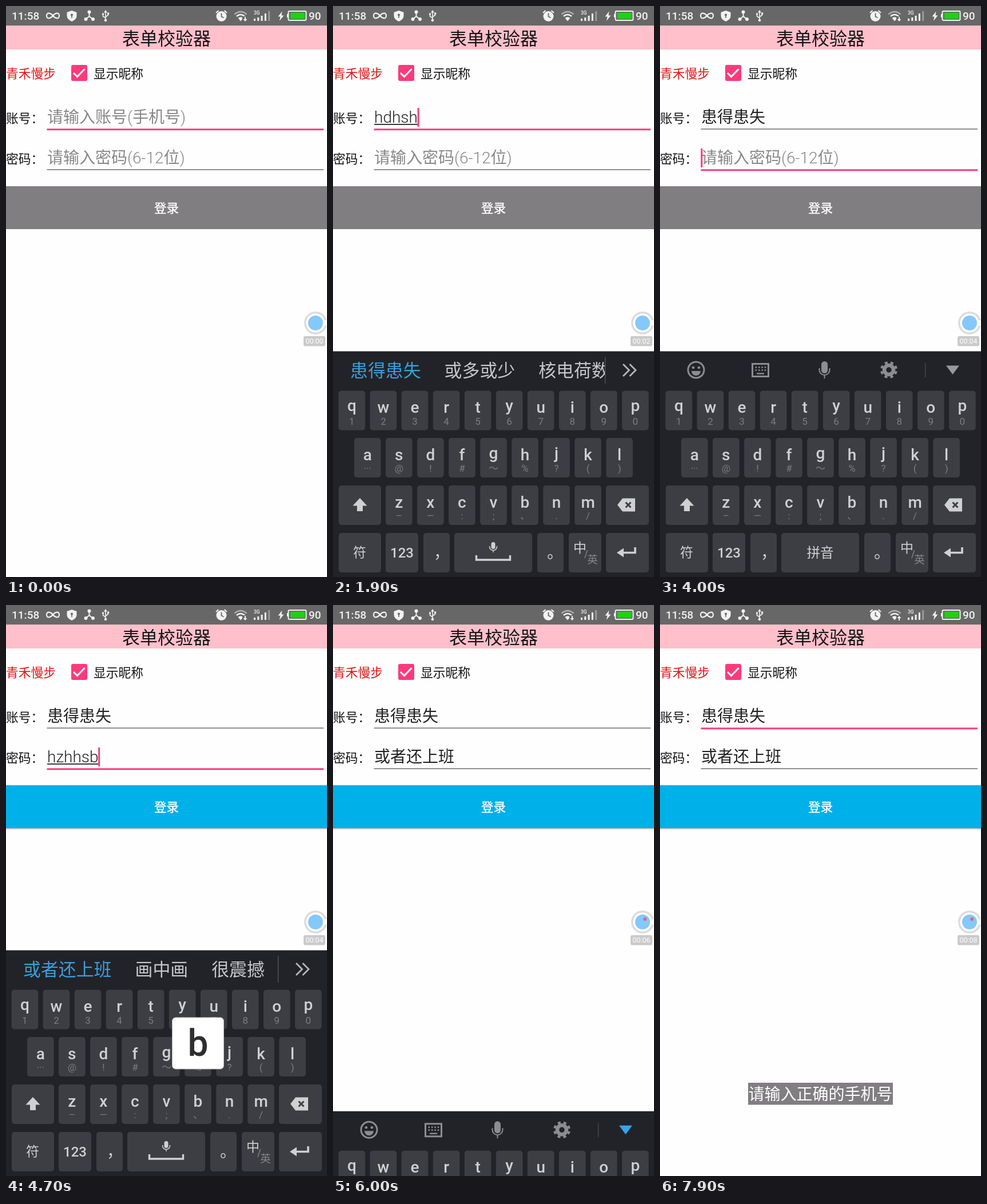
An HTML page for the animation above (8000 ms loop, 561x998 px).

```html
<!DOCTYPE html>
<html lang="zh-CN">
<head>
<meta charset="utf-8">
<title>表单校验器</title>
<style>
html, body { margin: 0; width: 100%; height: 100%; overflow: hidden; background: #fefefe; }
svg { display: block; width: 561px; height: 998px; }
text { font-family: Roboto, "Noto Sans CJK SC", "Noto Sans CJK", sans-serif; white-space: pre; }
</style>
</head>
<body>
<svg id="stage" viewBox="0 0 561 998" xmlns="http://www.w3.org/2000/svg"></svg>
<script>
const LOOP = 8000, STEP = 100, KB_HEIGHT = 395;
const PINK = '#fc3a7b', KEY = '#3d3e43', ICON = '#8c8d90', GLYPH = '#d0d0d2', BLUE = '#3a9fdc';

const rect = (x, y, w, h, fill, more = '') =>
  `<rect x="${x}" y="${y}" width="${w}" height="${h}" fill="${fill}" ${more}/>`;
const text = (x, y, size, fill, str, more = '') =>
  `<text x="${x}" y="${y}" font-size="${size}" fill="${fill}" ${more}>${str}</text>`;
const line = (d, color, width, more = '') =>
  `<path d="${d}" fill="none" stroke="${color}" stroke-width="${width}" ${more}/>`;
const fill = (d, color, more = '') => `<path d="${d}" fill="${color}" ${more}/>`;
const disc = (x, y, r, color, more = '') => `<circle cx="${x}" cy="${y}" r="${r}" fill="${color}" ${more}/>`;
const ring = (x, y, r, color, width, more = '') =>
  disc(x, y, r, 'none', `stroke="${color}" stroke-width="${width}" ${more}`);
const MID = 'text-anchor="middle"', BOLD = 'font-weight="500"';

function statusBar() {
  const c = '#f2f2f2';
  let s = rect(0, 0, 561, 34.5, '#676767');
  s += text(10, 23.5, 19, c, '11:58', BOLD) + text(529, 23.5, 19, c, '90', BOLD);
  s += line('M82 17C78 12 71 10.500 71 17S78 22 82 17S93 10.500 93 17S86 22 82 17Z', c, 2.2);
  s += fill('M115 8l8.500 3v6c0 5-4 8-8.500 10c-4.500-2-8.500-5-8.500-10v-6z', c);
  s += disc(115, 15.5, 2, '#676767') + rect(114.2, 16, 1.6, 5, '#676767');
  s += line('M145.500 11v7l-6 5M145.500 18l6 5', c, 2);
  s += disc(145.5, 10.5, 3, c) + disc(139.5, 23, 3, c) + disc(152, 23, 3, c);
  s += line('M174 10v15M174 21l-4.500-3v-4M174 19l4.500-3v-3', c, 1.6);
  s += fill('M174 7l3 4.500h-6z', c) + disc(174, 25, 2.3, c) + disc(169.5, 14, 1.7, c) + rect(177, 11.5, 3.2, 3.2, c);
  s += disc(376.5, 18, 9, c) + line('M376.500 12.500v6l4 2', '#676767', 1.8);
  s += line('M367 12l4.500-4M386 12l-4.500-4', c, 2.2);
  s += line('M399.500 14.500Q410 5.500 420.500 14.500', '#b0b0b0', 2.6);
  s += line('M403 18Q410 12 417 18', c, 2.6) + fill('M405.500 21Q410 17.500 414.500 21L410 26.500z', c);
  s += '<g id="wifi"><rect x="413" y="18" width="9" height="9" fill="#676767"/>' +
    `<path id="arrow" fill="${c}"/></g>`;
  s += text(433, 14.5, 8.5, c, '3G', BOLD);
  for (let i = 0; i < 5; i++) {
    const h = [4, 6, 9, 13, 17][i];
    s += rect(433 + i * 6.3, 26 - h, 3, h, i < 4 ? c : '#999');
  }
  s += fill('M482.500 9.500l-7 9h4l-1.500 7.500l7.500-9.500h-4z', c);
  s += rect(493.5, 9, 31, 16, 'none', `rx="2" stroke="${c}" stroke-width="2"`);
  s += rect(491, 14, 2, 6, c) + rect(497, 11.5, 25, 11, '#1fd113');
  return s;
}

function form() {
  let s = rect(0, 34.5, 561, 41.5, '#ffbfcb') + text(280.5, 68, 31, '#151515', '表单校验器', MID + ' font-weight="300"');
  s += text(0, 126, 21.75, '#e51414', '青禾慢步');
  s += rect(114, 103, 28, 28, PINK, 'rx="3"') + line('M118 117l6.500 6.500L137.500 110', '#fff', 3);
  s += text(153, 126, 21.75, '#111', '显示昵称');
  s += text(0, 204, 21.75, '#111', '账号：') + text(0, 275, 21.75, '#111', '密码：');
  for (const [id, y] of [['user', 203.5], ['pass', 274.5]]) {
    s += `<g font-weight="300">${text(72, y, 28, '#222', '', `id="${id}"`)}</g>`;
    s += rect(72, y + 2.5, 0, 1.8, '#222', `id="${id}Mark"`);
    s += rect(71.5, y + 10.8, 483.5, 1.6, '#777', `id="${id}Line"`);
    s += rect(72, y - 25.5, 3, 33, PINK, `id="${id}Caret"`);
  }
  s += '<g id="shade">' + rect(0, 388, 561, 3, '#000', 'opacity=".22"') + rect(0, 390, 561, 3, '#000', 'opacity=".1"') + '</g>';
  s += rect(0, 315, 561, 75, '#807e80', 'id="login"');
  s += text(280.5, 361, 21.5, '#fff', '登录', `${MID} ${BOLD} stroke="#fff" stroke-width=".4"`);
  s += '<g id="toast">' + rect(154, 835, 253, 38.5, '#807e80') +
    text(280.5, 865, 28, '#fff', '请输入正确的手机号', MID + ' font-weight="300"') + '</g>';
  return s;
}

function recorder() {
  return disc(541, 554, 20, '#dcdbdd') + disc(541, 554, 16.5, '#fff') + disc(541, 554, 13, '#84c8fc') +
    rect(556, 549, 5, 10, '#fff', 'rx="2"') + disc(545.3, 549, 3, '#f0645f', 'id="dot"') +
    rect(520, 577, 38, 17.5, '#cbcacb', 'rx="3"') + text(539, 590.3, 12.5, '#fff', '', `id="clock" ${MID}`);
}

const keyPos = {};
function letterRow(x, y, letters, marks) {
  return [...letters].map((ch, i) => {
    const left = x + i * 55.05, cx = left + 23.3;
    keyPos[ch] = [cx, y];
    const lift = 'qypgj'.includes(ch) ? 3 : 0;
    return rect(left, y, 46.6, 69, KEY, 'rx="5"') +
      text(cx, y + 38.5 - lift, 28, GLYPH, ch, `${MID} ${BOLD}`) +
      text(cx, y + 59, 17, '#7c7d80', marks[i], MID);
  }).join('');
}

function toolbar() {
  let s = ring(63, 636, 14, ICON, 3) + disc(58, 632, 2.3, ICON) + disc(68, 632, 2.3, ICON) +
    fill('M55 638h16a8 8 0 0 1-16 0z', ICON);
  s += rect(161.5, 625.5, 28, 22, 'none', `stroke="${ICON}" stroke-width="3"`);
  s += line('M166.500 631.500h19M166.500 636.500h19', ICON, 2.6, 'stroke-dasharray="2.6 2.8"') + line('M169 642.500h13', ICON, 2.4);
  s += rect(282, 621, 11, 21, ICON, 'rx="5.5"') + line('M278.500 633v3a9 9 0 0 0 18 0v-3M287.500 645v6', ICON, 2);
  const tooth = Math.PI * 26 / 16;
  s += ring(400, 636, 8, ICON, 6.5) +
    ring(400, 636, 13, ICON, 4, `stroke-dasharray="${tooth}" transform="rotate(11 400 636)"`);
  s += rect(463, 624, 1.3, 25, '#4b4c50') + fill('M500 628.500h23L511.500 644z', '#98999c', 'id="hide"');
  return `<g id="tools">${s}</g>`;
}

function keyboard() {
  let s = rect(0, 603.5, 561, 396, '#222329') + toolbar();
  s += '<g id="strip">' + rect(7, 604, 168, 66, KEY, 'id="press"') +
    '<g id="words" clip-path="url(#cut)" font-weight="300"></g>' + rect(475, 613, 1.3, 47, '#55565a') +
    line('M507 626l10.500 10.500L507 647M518.500 626l10.500 10.500L518.500 647', '#b4b5b8', 2.8) + '</g>';
  s += letterRow(9.6, 672.5, 'qwertyuiop', '1234567890');
  s += letterRow(37, 755, 'asdfghjkl', ['···', '@', '!', '#', '～', '%', '?', '(', ')']);
  s += letterRow(92, 838, 'zxcvbnm', ['–', '—', ':', ';', '、', '.', '/']);
  const wide = [[838, 10, 74], [838, 477, 75], [921, 10, 74], [921, 92, 57], [921, 158, 46],
    [921, 212, 136], [921, 357, 46], [921, 412, 57], [921, 477, 75]];
  for (const [y, x, w] of wide) s += rect(x, y, w, 69, KEY, 'rx="5"');
  s += fill('M47 860l12.500 13.500h-7.500v9.500h-10v-9.500h-7.500z', GLYPH);
  s += fill('M497 872l9-11.500h22v23h-22z', GLYPH) + line('M511.500 867.500l9 9M520.500 867.500l-9 9', KEY, 3);
  s += text(46.5, 963, 23, GLYPH, '符', MID) + text(120.5, 964, 24, GLYPH, '123', `${MID} ${BOLD}`);
  s += text(176, 965, 28, GLYPH, '，') + text(374, 965, 28, GLYPH, '。');
  s += text(280, 964, 23.5, GLYPH, '拼音', `id="pinyin" ${MID}`);
  s += '<g id="voice">' + rect(276.5, 937, 7, 12, GLYPH, 'rx="3.5"') +
    line('M273.500 944v1a6.500 6.500 0 0 0 13 0v-1M280 951v4', GLYPH, 1.5) +
    line('M250.500 960v8h59v-8', GLYPH, 3.4) + '</g>';
  s += text(431.5, 954.5, 23, GLYPH, '中', MID) + line('M444.500 951l-4.500 14', ICON, 1.2) +
    text(453.5, 974, 18.5, '#85868a', '英', MID);
  s += line('M528 946v9.500h-22', GLYPH, 3.6) + fill('M496 955.500l12-8v16z', GLYPH);
  s += '<g id="popup">' + rect(-45, -117, 90, 90, '#fff', 'rx="6" stroke="#bbb" stroke-width="1"') +
    text(0, -50, 64, '#2e2e30', '', `id="popKey" ${MID} ${BOLD}`) + '</g>';
  return `<g id="board">${s}</g>`;
}

const stage = document.getElementById('stage');
stage.innerHTML = '<defs><clipPath id="cut"><rect x="0" y="603" width="475" height="67"/></clipPath></defs>' +
  statusBar() + form() + recorder() + keyboard();

const el = {};
stage.querySelectorAll('[id]').forEach(n => el[n.id] = n);
const set = (id, name, value) => el[id].setAttribute(name, value);
const show = (id, on) => set(id, 'visibility', on ? 'visible' : 'hidden');
const write = (id, str) => { if (el[id].textContent !== str) el[id].textContent = str; };
const within = (t, spans) => spans.some(([a, b]) => t >= a && t < b);
const clamp = v => Math.min(1, Math.max(0, v));

// Each field: key presses, commit time, final text, focus and caret spans.
const fields = [
  { id: 'user', keys: 'hdhsh', at: [1300, 1500, 1600, 1700, 1800], commit: 2400, final: '患得患失',
    hint: '请输入账号(手机号)', focus: [[0, 3700], [7900, 8000]], caret: [[100, 600], [1100, 3000], [3500, 3700]] },
  { id: 'pass', keys: 'hzhhsb', at: [4200, 4300, 4400, 4500, 4600, 4700], commit: 5200, final: '或者还上班',
    hint: '请输入密码(6-12位)', focus: [[3700, 5900]], caret: [[3800, 5800]] }
];
const guesses = {
  h: '和 好 还 会 或', hd: '活动 回到 很多', hdh: '很多会 活动后 回答好', hdhs: '活动会上 很多话说 好多好事',
  hdhsh: '患得患失 或多或少 核电荷数', hz: '孩子 或者 合作', hzh: '或者会 孩子和 很正好',
  hzhh: '或者还会 孩子很好 合作', hzhhs: '或者还是 孩子还小 很正好', hzhhsb: '或者还上班 画中画 很震撼'
};

function drawWords(str) {
  if (el.words.dataset.str === str) return;
  el.words.dataset.str = str;
  let x = 30;
  el.words.innerHTML = str.split(' ').map((w, i) => {
    const out = text(x, 647.5, 30.9, i ? '#c6c7ca' : BLUE, w);
    x += w.length * 30.9 + 41;
    return out;
  }).join('');
}

function boardShift(t) {
  if (t < 1000) return KB_HEIGHT * (1 - clamp((t - 100) / 400)) ** 2;
  return KB_HEIGHT * clamp(((t - 5800) / 237) ** 2 * (t > 5800));
}

function drawField(f, t) {
  const n = f.at.filter(k => t >= k).length;
  const composing = n > 0 && t < f.commit;
  const typed = f.keys.slice(0, n);
  const value = composing ? typed : n ? f.final : '';
  write(f.id, value || f.hint);
  set(f.id, 'fill', value ? '#222' : '#888');
  const w = value ? el[f.id].getComputedTextLength() : 0;
  set(f.id + 'Mark', 'width', composing ? w : 0);
  set(f.id + 'Caret', 'x', 72 + w - (value ? 0.3 : 0.7));
  show(f.id + 'Caret', within(t, f.caret));
  const focused = within(t, f.focus);
  set(f.id + 'Line', 'fill', focused ? PINK : '#777');
  set(f.id + 'Line', 'height', focused ? 3 : 1.6);
  const last = f.at.indexOf(t);
  return { value, guess: composing ? guesses[typed] : '', key: last < 0 ? '' : f.keys[last] };
}

function draw(ms) {
  const t = Math.floor(ms % LOOP / STEP) * STEP;
  const [user, pass] = fields.map(f => drawField(f, t));

  const guess = user.guess || pass.guess;
  show('strip', guess);
  show('tools', !guess);
  if (guess) drawWords(guess);
  set('press', 'opacity', within(t, [[2300, 2400], [5100, 5200]]) ? 1 : 0);
  const voice = within(t, [[1300, 3700], [4200, 8000]]);
  show('voice', voice);
  show('pinyin', !voice);

  const key = user.key || pass.key;
  show('popup', key);
  if (key) {
    write('popKey', key);
    set('popup', 'transform', `translate(${keyPos[key]})`);
  }
  set('board', 'transform', `translate(0 ${boardShift(t)})`);
  set('hide', 'fill', t >= 5800 ? '#36a4ee' : '#98999c');

  const ready = user.value && pass.value;
  set('login', 'fill', !ready ? '#807e80' : within(t, [[6300, 6500]]) ? '#0aa2d4' : '#00b0e8');
  show('shade', ready);
  set('toast', 'opacity', clamp((t - 6300) / 400));

  write('clock', '00:0' + Math.floor((t + 100) / 1000));
  show('dot', within(t, [[500, 1000], [1600, 1800], [2700, 3000], [3700, 3900], [4800, 5200],
    [5900, 6300], [6900, 7500], [7900, 8000]]));
  show('wifi', !within(t, [[1800, 3900]]));
  set('arrow', 'd', t >= 6900 ? 'M418 19l3.500 4h-2.500v4h-2v-4h-2.500z' : 'M418 27l3.500-4h-2.500v-4h-2v4h-2.500z');
}

const start = performance.now();
function tick() {
  draw(performance.now() - start);
  requestAnimationFrame(tick);
}
tick();
</script>
</body>
</html>
```
